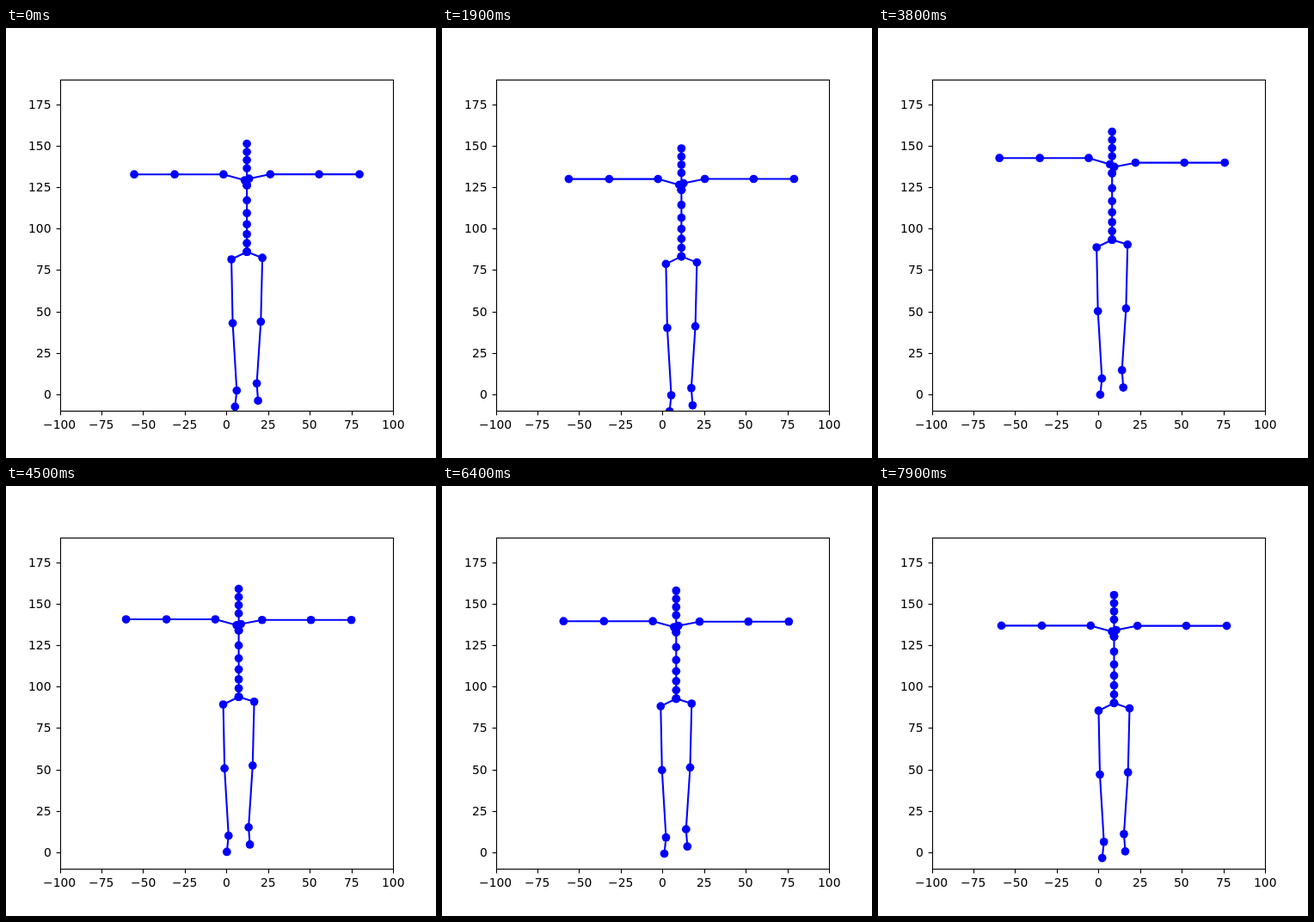
Animation, 500 px wide and 500 px high, one loop 8 s. Source, as an HTML page with a canvas:

```html
<!DOCTYPE html>
<html>
<head>
<meta charset="utf-8">
<style>
html, body { margin: 0; width: 100%; height: 100%; overflow: hidden; background: #fff; }
canvas { display: block; }
</style>
</head>
<body>
<canvas id="stage" width="500" height="500"></canvas>
<script>
const ctx = document.getElementById('stage').getContext('2d');
const LOOP = 8000, STEP = 100;
const LEFT = 62.5, RIGHT = 450, TOP = 60, BOTTOM = 445;

// Path of the pelvis: time, x, y
const path = [
  [0, 280.1, 260.2], [800, 268.1, 240.2], [1080, 260.3, 231.5], [1900, 278.4, 265.6],
  [2300, 276, 268], [3800, 272.2, 246.2], [4150, 264.2, 234], [4850, 277, 256.5],
  [5200, 273.3, 252.2], [5800, 275, 257.2], [6400, 272.3, 247.3],
  [7080, 265.2, 232.5], [7600, 276, 253.5], [7900, 274.5, 252.4]
];

// Slope at a key: flat at turning points, otherwise through its neighbours
function slope(i, c) {
  const a = path[i - 1], b = path[i], d = path[i + 1];
  if (!a || !d || (b[c] - a[c]) * (d[c] - b[c]) <= 0) return 0;
  return (d[c] - a[c]) / (d[0] - a[0]);
}

function sample(t, c) {
  let i = path.findIndex(k => k[0] > t) - 1;
  if (i < 0) i = path.length - 2;
  const a = path[i], b = path[i + 1], h = b[0] - a[0];
  const u = Math.min(1, (t - a[0]) / h), v = 1 - u;
  return v * v * (1 + 2 * u) * a[c] + u * u * (3 - 2 * u) * b[c] +
    h * u * v * (v * slope(i, c) - u * slope(i + 1, c));
}

// The left shoulder rises once per bounce
function shoulderLift(t) {
  return [3.3, 6.4, 3].reduce((sum, size, i) =>
    sum + size * Math.exp(-(((t - 950 - 3000 * i) / 300) ** 2)), 0);
}

function line(x1, y1, x2, y2) {
  ctx.beginPath();
  ctx.moveTo(x1, y1);
  ctx.lineTo(x2, y2);
  ctx.stroke();
}

// Labels start on whole pixels; align is 0.5 for centred, 1 for right
function label(value, x, y, align) {
  const text = String(value).replace('-', '\u2212');
  ctx.fillText(text, Math.round(x - ctx.measureText(text).width * align), Math.round(y));
}

function drawAxes() {
  ctx.strokeStyle = ctx.fillStyle = '#000';
  ctx.lineWidth = 1.11;
  ctx.strokeRect(63.5, 60.5, 387, 385);
  ctx.font = '13.89px "DejaVu Sans", sans-serif';
  for (let v = -100; v <= 100; v += 25) {
    const x = LEFT + (v + 100) * 1.9375, px = Math.round(x) + 0.5;
    line(px, 445.5, px, 450.4);
    label(v, x, 466, 0.5);
  }
  for (let v = 0; v <= 175; v += 25) {
    const y = BOTTOM - (v + 10) * 1.925, py = Math.round(y) + 0.5;
    line(58.6, py, 63.5, py);
    label(v, 52.8, y + 5, 1);
  }
}

function drawChain(points) {
  ctx.beginPath();
  points.forEach(([x, y]) => ctx.lineTo(x, y));
  ctx.stroke();
  for (const [x, y] of points) {
    ctx.beginPath();
    ctx.arc(x, y, 4.86, 0, 2 * Math.PI);
    ctx.fill();
  }
}

// Seven vertebrae with widening gaps, then four evenly spaced head joints
const spineJoint = n => [0, n < 7 ? -9.9 * n - 0.083 * n ** 3 : -97.1 - 9.5 * (n - 7)];

// side is -1 for left, 1 for right
const arm = (side, collarY, y) => [
  spineJoint(6), [side * 2.5, collarY], [side * 27.2, y], [side * 84, y], [side * 131, y]
];

function skeleton(t, y) {
  const lift = shoulderLift(t);
  const tilt = Math.max(0, Math.min(2, (260 - y) / 10));
  return [
    Array.from({ length: 11 }, (_, n) => spineJoint(n)),
    arm(-1, -83.2 - lift * 0.9, -90 - lift),
    arm(1, -85 + tilt * 0.2, -90.1 + tilt * 0.4),
    [[0, 0], [-18, 8.8], [-16.5, 83.1], [-11.8, 161.4], [-13.8, 180.2]],
    [[0, 0], [18, 7 - tilt], [16.2, 81.3 - tilt], [11.5, 153.1 - tilt], [13, 173.2 - tilt]]
  ];
}

function drawBody(t) {
  const x = sample(t, 1), y = sample(t, 2);
  ctx.save();
  ctx.beginPath();
  ctx.rect(LEFT, TOP, RIGHT - LEFT, BOTTOM - TOP);
  ctx.clip();
  ctx.strokeStyle = ctx.fillStyle = '#00f';
  ctx.lineWidth = 2.08;
  ctx.lineJoin = 'round';
  for (const chain of skeleton(t, y)) drawChain(chain.map(([dx, dy]) => [x + dx, y + dy]));
  ctx.restore();
}

const start = performance.now();
function frame() {
  const t = (performance.now() - start) % LOOP;
  ctx.fillStyle = '#fff';
  ctx.fillRect(0, 0, 500, 500);
  drawBody(Math.floor(t / STEP) * STEP);
  drawAxes();
  requestAnimationFrame(frame);
}
frame();
</script>
</body>
</html>
```
